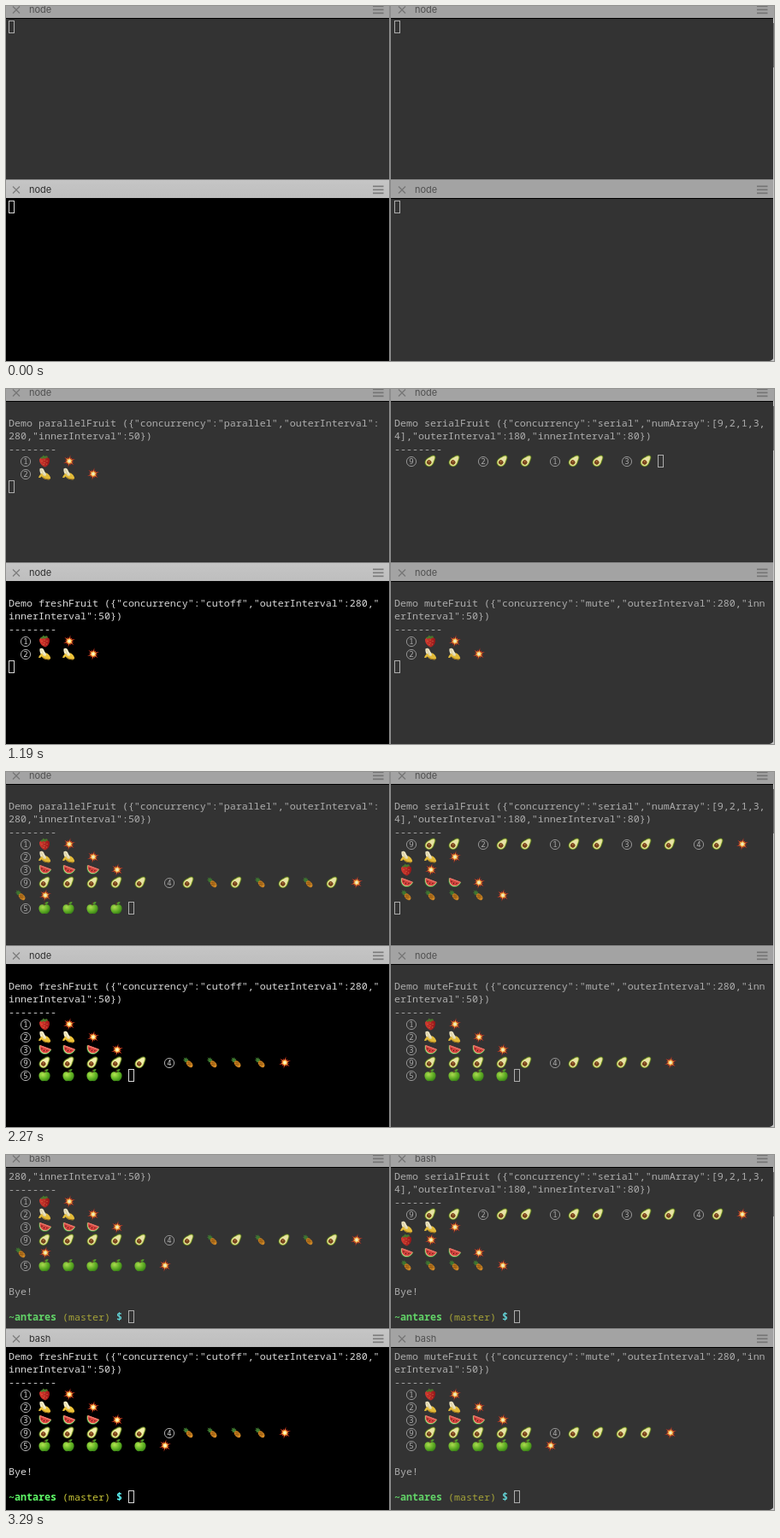
An HTML page that plays this animation: 898x416 px, repeating every 4430 ms.

```html
<!DOCTYPE html>
<html lang="en">
<head>
<meta charset="utf-8">
<title>Concurrency demo terminals</title>
<style>
  html, body { margin: 0; width: 100%; height: 100%; overflow: hidden; background: #333; }
  svg { display: block; width: 100vw; height: 100vh; }
  .mono { font: 11.67px "Noto Sans Mono", "DejaVu Sans Mono", monospace; }
  .num { font: 9px "Noto Sans Mono", "DejaVu Sans Mono", monospace; text-anchor: middle; }
  .title { font: 11px Inter, "Liberation Sans", sans-serif; }
  .bold { font-weight: 700; }
</style>
</head>
<body>
<svg viewBox="0 0 898 416" xmlns="http://www.w3.org/2000/svg">
  <defs>
    <radialGradient id="skin" cx=".35" cy=".3" r=".8">
      <stop offset="0" stop-color="#b4e552"/><stop offset=".55" stop-color="#63b524"/><stop offset="1" stop-color="#2f7a12"/>
    </radialGradient>
    <linearGradient id="berry" x1="0" x2="1">
      <stop offset="0" stop-color="#e03c30"/><stop offset="1" stop-color="#9c1418"/>
    </linearGradient>
    <linearGradient id="barOn" x2="0" y2="1">
      <stop offset="0" stop-color="#c5c5c5"/><stop offset="1" stop-color="#bebebe"/>
    </linearGradient>
    <g id="S">
      <path d="M-5.8-2.4C-6.6 2-2.5 6.6 1 6.9C4.8 5.8 7 .5 5.6-3C3-6-3.6-5.6-5.8-2.4Z" fill="url(#berry)"/>
      <path d="M-3 0h.1M0 2h.1M3 0h.1M-1 4h.1M2.6 3.6h.1M0-1.4h.1" stroke="#e89a52" stroke-width=".8" stroke-linecap="round"/>
      <path d="M-5-4L-2.2-5.4L-1.6-7L0-5.8L3-6.2L4.2-4L2-4L.8-2.6L-1-3.8L-3.2-2.6Z" fill="#4a7d2c"/>
    </g>
    <g id="B">
      <path d="M-5.6-6C-4.2-7.4-1.6-6.8-.8-5C.2-2.2 1.8-.4 3.8 1.8L-1.6 4C-4.6 1-6-2.8-5.6-6Z" fill="#f6efcb"/>
      <path d="M-3.8-5.4C-2.8-2-1 1 .8 2.6" fill="none" stroke="#dccb95" stroke-width=".8"/>
      <path d="M-7 4.2C-6 1-4-.2-2.8-.8C-1.8 1.6-.4 2.6 1.2 2.4C2 1 2 0 1.4-1.6C4.4-.8 6.8 2 7.2 5L5.6 6.8C1 7-2 5.4-3.4 2.8C-4 4.2-5.2 5-7 4.2Z" fill="#eec43a"/>
      <path d="M-2.4 2.8C-1 4.6 2 6 5.4 5.8L7 5.2L5.6 6.8C1.2 7.1-1.8 5.6-2.4 2.8Z" fill="#a97c1c"/>
    </g>
    <g id="M" transform="rotate(20)">
      <path d="M-7.8-2.8C-6.8 3-3.4 5.4 0 5.4S6.8 3 7.8-2.8Z" fill="#3c8c33"/>
      <path d="M-7.2-3C-6 2.4-3 4.4 0 4.4S6 2.4 7.2-3Z" fill="#e6efb4"/>
      <path d="M-6.8-3.4C-5.6 1.8-3 3.6 0 3.6S5.6 1.8 6.8-3.4Z" fill="#e0453f"/>
      <path d="M-6.8-3.4L6.8-3.4L6-2L-6-2Z" fill="#f07a6c"/>
      <path d="M-3.4-.4l.3.8M-.2.6v.9M3.2-.4l-.3.8" stroke="#451312" stroke-width=".9" stroke-linecap="round"/>
    </g>
    <g id="A" transform="rotate(40) scale(1.1)">
      <path d="M0-7.8C2.6-7.8 3.2-4.6 4.1-2.2C5.8 2.4 4.2 6.6 0 6.6S-5.8 2.4-4.1-2.2C-3.2-4.6-2.6-7.8 0-7.8Z" fill="#4a6420"/>
      <path d="M0-7C2-7 2.5-4 3.4-1.8C5 2.2 3.6 5.8 0 5.8S-5 2.2-3.4-1.8C-2.5-4-2-7 0-7Z" fill="#cfdc62"/>
      <path d="M0-6.2C1.5-6.2 1.9-3.6 2.8-1.4C4.2 2 3.1 5 0 5S-4.2 2-2.8-1.4C-1.9-3.6-1.5-6.2 0-6.2Z" fill="#f3efad"/>
      <circle cy="1.8" r="2.5" fill="#7b4419"/><circle cx="-.7" cy="1" r=".8" fill="#b87a42"/>
    </g>
    <g id="P" transform="rotate(-42)">
      <path d="M0-1L-3-3L-1.8-4L-2.6-6.4L-.8-5.4L0-8L1-5.4L2.8-6.2L1.8-4L3-2.8Z" fill="#3f7a30"/>
      <ellipse cy="2.4" rx="2.9" ry="4.5" fill="#d98e27"/>
      <path d="M-2.6.2L2 5M-1.2-1.2L2.7 3M2.6.2L-2 5M1.2-1.2L-2.7 3" stroke="#94570f" stroke-width=".7"/>
    </g>
    <g id="G">
      <path d="M0-3.4C3-5.6 6.8-3.6 6.6.6C6.4 4 4 7 1.8 6.8C.6 6.4-.6 6.4-1.8 6.8C-4 7-6.4 4-6.6.6C-6.8-3.6-3-5.6 0-3.4Z" fill="url(#skin)"/>
      <path d="M-.2-3C-.2-5 0-6 1-7" fill="none" stroke="#6b4a20"/>
      <path d="M.4-5C1.2-7 3.2-7.4 4.6-7C4-5 2.2-4.2.4-5Z" fill="#58a82a"/>
    </g>
    <g id="boom"></g>
  </defs>
  <g id="stage"></g>
</svg>
<script>
const LOOP = 4430, CELL = 7, LINE = 15, ROWS = 12;
const TICKS = [0, 480, 630, 690, 760, 830, 880, 940, 1000, 1070, 1130, 1190, 1270, 1350, 1430, 1500,
  1570, 1630, 1680, 1740, 1800, 1850, 1910, 1960, 2020, 2080, 2150, 2210, 2270, 2330, 2390,
  2540, 2600, 2750, 3290];

const ON = { bg: '#000', bar: 'url(#barOn)', title: '#2e2e2e', icon: '#7c7c7c', text: '#d9d9d9',
  path: '#5ffa68', branch: '#c7c437', sign: '#60fdff', fruit: 1 };
const DIM = { bg: '#333', bar: '#a3a3a3', title: '#505050', icon: '#757575', text: '#adadad',
  path: '#62d468', branch: '#a5a338', sign: '#63d3d6', fruit: .94 };

// Output script: [start ms, ms per fruit, tokens]; digits print at once, "!" bursts and ends the line.
const intro = [[690, 50, '1S!'], [970, 50, '2BB!'], [1250, 50, '3MMM!'], [1530, 50, '9AAAAA']];
const apples = [2060, 50, '5GGGGG!'];
const panes = [
  { x: 0, y: 0, look: DIM, bye: 2540, prompt: 2600, bash: 2750,
    head: ['Demo parallelFruit ({"concurrency":"parallel","outerInterval":', '280,"innerInterval":50})'],
    script: [...intro, [1810, 0, '4'], [1830, 28, 'APAPAPA!P!'], apples] },
  { x: 451, y: 0, look: DIM, bye: 2330, prompt: 2390, bash: 2750,
    head: ['Demo serialFruit ({"concurrency":"serial","numArray":[9,2,1,3,', '4],"outerInterval":180,"innerInterval":80})'],
    script: [[630, 80, '9AA'], [815, 66, '2AA'], [985, 60, '1AA'], [1125, 60, '3AA'], [1290, 60, '4A!'],
      [1350, 70, 'BB!S!MMM!PPPP!']] },
  { x: 0, y: 211, look: ON, bye: 2540, prompt: 2600, bash: 3290,
    head: ['Demo freshFruit ({"concurrency":"cutoff","outerInterval":280,"', 'innerInterval":50})'],
    script: [...intro, [1810, 50, '4PPPP!'], apples] },
  { x: 451, y: 211, look: DIM, bye: 2540, prompt: 2600, bash: 2750,
    head: ['Demo muteFruit ({"concurrency":"mute","outerInterval":280,"inn', 'erInterval":50})'],
    script: [...intro, [1800, 45, '4AAAA!'], apples] }
];

const rect = (x, y, w, h, fill) => `<rect x="${x}" y="${y}" width="${w}" height="${h}" fill="${fill}"/>`;
const text = (x, y, s, fill, cls = 'mono') => `<text x="${x}" y="${y}" fill="${fill}" class="${cls}">${s}</text>`;

function star(r, inner, fill) {
  const pts = Array.from({ length: 24 }, (_, i) => {
    const a = i * Math.PI / 12 + .7, d = i % 2 ? inner : r * (i % 4 ? .72 : 1);
    return `${(d * Math.cos(a)).toFixed(2)},${(d * Math.sin(a)).toFixed(2)}`;
  });
  return `<polygon points="${pts.join(' ')}" fill="${fill}"/>`;
}

function bar({ x, y, look, bash }, t) {
  const cy = y + 4, left = x ? 450 : 0, c = look.icon, cx = x + 12;
  const lines = [-4, 0, 4].map(d => rect(x ? 878 : 429, cy + d - .5, 12.5, 1.7, c)).join('');
  return rect(left, y - 7, 448, 21, look.bar) +
    `<path d="M${cx - 4} ${cy - 3.5}l8 8m0-8l-8 8" stroke="${c}" stroke-width="1.2"/>` + lines +
    text(x + 27, y + 8, t >= bash ? 'bash' : 'node', look.title, 'title') +
    rect(left, y + 14, 448, 1, '#000');
}

function screen(p, t) {
  const { look } = p, items = [];
  let row = 0, col = 0;
  const put = (c, draw) => items.push([row, p.x + 3 + c * CELL, draw]);
  const write = (s, fill = look.text, cls) => {
    put(col, (x, y) => text(x, y + 12, s, fill, cls));
    col += s.length;
  };
  const newline = () => { row++; col = 0; };
  const icon = (id, dx = 0) => {
    put(col + 1, (x, y) => `<use href="#${id}" x="${x + 7 + dx}" y="${y + 7.5}" opacity="${look.fruit}"/>`);
    col += 4;
  };
  const number = n => {
    put(col + 2, (x, y) => `<circle cx="${x + 6}" cy="${y + 8}" r="5.6" fill="none" stroke="${look.text}" stroke-width=".8"/>` +
      text(x + 6, y + 11.3, n, look.text, 'num'));
    col += 4;
  };

  if (t >= 480) {
    newline();
    for (const s of [...p.head, '--------']) { write(s); newline(); }
    for (const [start, step, tokens] of p.script) {
      let at = start;
      for (const k of tokens) {
        if (/[A-Z]/.test(k)) at += step;
        if (at > t) break;
        if (k === '!') { icon('boom', 1); newline(); }
        else if (k > '9') icon(k);
        else number(k);
      }
    }
  }
  if (t >= p.bye) { newline(); write('Bye!'); newline(); newline(); }
  if (t >= p.prompt) {
    write('~antares', look.path, 'mono bold'); col++;
    write('(master)', look.branch); col++;
    write('$', look.sign, 'mono bold'); col++;
  }
  put(col, (x, y) => `<rect x="${x + .5}" y="${y + .5}" width="6" height="14" fill="none" stroke="${look.text}"/>`);

  const scroll = Math.max(0, row - ROWS + 1);
  return items.filter(i => i[0] >= scroll)
    .map(([r, x, draw]) => draw(x, p.y + 17 + (r - scroll) * LINE)).join('');
}

function frame(t) {
  return panes.map(p => rect(p.x ? 450 : 0, p.y + 14, 448, p.y ? 191 : 189, p.look.bg) + bar(p, t) + screen(p, t)).join('') +
    rect(448, 0, 2, 416, '#8c8c8c') + rect(0, 203, 898, 1, '#8c8c8c') +
    rect(897, 14, 1, 402, '#c8c8c8') + rect(897, 20, 1, 52, '#6b6b6b') +
    '<path d="M898 411v5h-5q4-1 5-5Z" fill="#c8c8c8"/>';
}

document.getElementById('boom').innerHTML =
  star(7.4, 3, '#d8301f') + star(5.4, 2.6, '#f07a2a') + star(4, 2.2, '#fbd35a') + star(2.2, 1.4, '#fff6d0');

const stage = document.getElementById('stage');
let shown = -1;
function update() {
  const now = performance.now() % LOOP;
  const tick = TICKS.findLast(t => t <= now);
  if (tick !== shown) stage.innerHTML = frame(shown = tick);
  requestAnimationFrame(update);
}
update();
</script>
</body>
</html>
```
